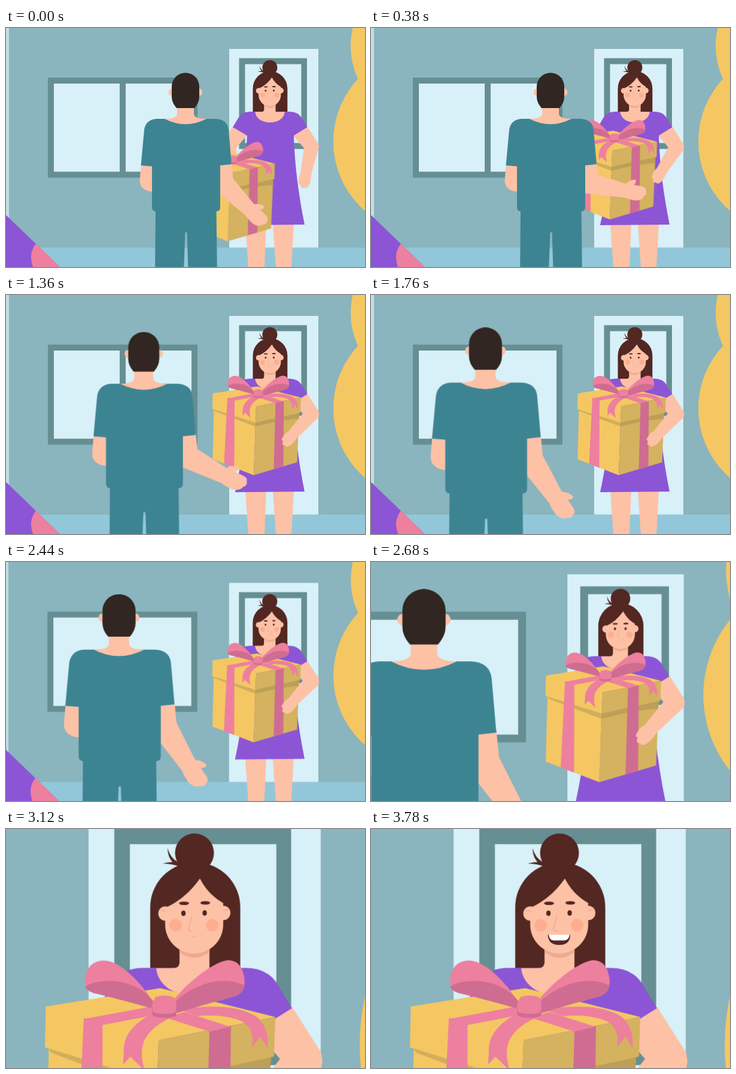
Recreate the animation shown at these times as an HTML page. Size 600 px wide and 400 px high, loop 4000 ms.

```html
<!DOCTYPE html>
<html lang="en">
<head>
<meta charset="utf-8">
<title>Gift delivery</title>
<style>
  html, body { margin: 0; height: 100%; overflow: hidden; background: #8ab4be; }
  svg { display: block; width: 100vw; height: 100vh; }

  .wall { fill: #8ab4be; }
  .floor { fill: #92c7d9; }
  .glass { fill: #d8f0f8; }
  .frame { fill: #668f94; }
  .skin { fill: #fdc1a6; }
  .shade { fill: #eea994; }
  .cheek { fill: #ffad91; }
  .hair { fill: #532722; }
  .crop { fill: #312621; }
  .shirt { fill: #3d8493; }
  .purple { fill: #8c55d5; }
  .yellow { fill: #f4c763; }
  .ochre { fill: #d4b25f; }
  .gap { fill: #d0ae5b; }
  .gap2 { fill: #bd9f57; }
  .pink { fill: #ed7f9f; }
  .rose { fill: #cf6c92; }
  .line { fill: none; stroke: #f0a48c; stroke-width: 1.2; stroke-linecap: round; }
  .lids { fill: none; stroke: #532722; stroke-width: 1.8; stroke-linecap: round; }

  .anim { animation: 4s linear infinite; }
  #camera { animation-name: zoom; transform-origin: 519.5px 82.4px; }
  #man { animation-name: leave; transform-origin: 845.5px 178.7px; }
  #reach { animation-name: reach; }
  #box { animation-name: hand-over; }
  #hold { animation-name: hold; transform-origin: 510.5px 200px; }
  #smile { animation-name: smile; transform-origin: 314px 179px; }
  #smirk { animation-name: smirk; animation-timing-function: step-end; }
  #eyes { animation-name: open; animation-timing-function: step-end; }
  #lids { animation-name: closed; animation-timing-function: step-end; }

  @keyframes zoom {
    0% { transform: scale(1); }
    60.375% { transform: scale(1); animation-timing-function: cubic-bezier(.85, 0, .68, 1); }
    73.5%, 100% { transform: scale(2.604); }
  }
  @keyframes leave {
    0% { transform: scale(1); }
    21.5% { transform: scale(1); animation-timing-function: cubic-bezier(.8, 0, .01, 1); }
    49.5%, 100% { transform: scale(1.2026); }
  }
  @keyframes reach {
    0% { transform: rotate(43deg); animation-timing-function: cubic-bezier(.75, 0, .25, 1); }
    17.5% { transform: rotate(-7.6deg); }
    21.5% { transform: rotate(-7.6deg); animation-timing-function: cubic-bezier(.82, 0, .035, 1); }
    49.5%, 100% { transform: rotate(55.5deg); }
  }
  @keyframes hand-over {
    0% { transform: translate(-43.5px, 55.5px); animation-timing-function: cubic-bezier(.75, 0, .25, 1); }
    17.5%, 100% { transform: translate(0, 0); }
  }
  @keyframes hold {
    0% { transform: rotate(0deg); animation-timing-function: cubic-bezier(.75, 0, .25, 1); }
    17.5%, 100% { transform: rotate(31deg); }
  }
  @keyframes smile {
    0%, 77.75% { transform: scale(0); }
    81.5%, 100% { transform: scale(1); }
  }
  @keyframes smirk { 0% { opacity: 1; } 78%, 100% { opacity: 0; } }
  @keyframes open { 0% { opacity: 1; } 91.5% { opacity: 0; } 94.5%, 100% { opacity: 1; } }
  @keyframes closed { 0% { opacity: 0; } 91.5% { opacity: 1; } 94.5%, 100% { opacity: 0; } }
</style>
</head>
<body>
<svg viewBox="0 0 600 400">
  <defs>
    <path id="upper" class="skin" d="M479 179L503.5 165L522 194Q525 203 512 208L498 201Z"/>
    <path id="fore" class="skin" d="M498 201A12.5 12.5 0 0 1 523 199L510 246Q510 255 507 262Q503 270 499 267Q494 270 493 264L492 262Q488 264 489 255Q489 248 492 244Z"/>
  </defs>
  <g id="camera" class="anim">
    <!-- room -->
    <rect class="wall" width="600" height="400"/>
    <rect class="floor" y="367.5" width="600" height="33"/>
    <rect width="5" height="367" fill="#bfdfe3"/>
    <rect class="frame" x="70" y="83" width="250" height="167.5"/>
    <path class="glass" d="M80 93H190V240.5H80ZM200 93H310V240.5H200Z"/>
    <rect class="glass" x="373" y="35" width="149" height="332.5"/>
    <rect class="frame" x="389.5" y="50.5" width="113.5" height="152"/>
    <rect class="glass" x="399.5" y="60.5" width="94" height="132"/>
    <g class="yellow"><circle cx="708" cy="30" r="132"/><circle cx="701" cy="190" r="154"/></g>
    <path class="purple" d="M0 313L90 400H0Z"/>
    <path class="pink" d="M50 361Q37 377 45 400H90Z"/>

    <!-- woman -->
    <path class="skin" d="M400 328H435L432 400H405ZM446 328H481L477 400H451Z"/>
    <g transform="matrix(-1 0 0 1 882.4 0)"><use href="#upper"/><use href="#fore"/></g>
    <use href="#upper"/>
    <g transform="scale(.38402) translate(833.3 132.2)">
      <path class="hair" d="M241 233V131A75.2 75.2 0 0 1 391.5 131V233Z"/>
      <circle class="hair" cx="315" cy="40" r="32.5"/>
      <path class="hair" d="M290 64Q270 54 270 32Q274 48 288 56ZM290 63Q277 58 262 58Q276 53 292 57Z"/>
    </g>
    <path class="purple" d="M408 140H474Q488 140 494.5 151L503.5 166L481 180Q483 250 499 329L383 330Q400 250 403 180L379 166L388 151Q394 140 408 140Z"/>
    <g transform="scale(.38402) translate(833.3 132.2)">
      <path class="skin" d="M251 233C257 295 374 295 380 233Z"/>
      <path class="skin" d="M290 190V222Q290 233 279 233V236H340V190Z"/>
      <path class="shade" d="M290 195V206Q315 225 340 206V195Z"/>
      <g class="skin"><ellipse cx="266" cy="141.5" rx="11.5" ry="12"/><ellipse cx="363.5" cy="140.5" rx="11.5" ry="12"/></g>
      <path class="line" d="M259 137Q266 135 268 141M371 136Q364 134 361 140"/>
      <path class="skin" d="M324 83Q300 117 266 132V160A48.5 48.5 0 0 0 363 160V124Q338 110 324 83Z"/>
      <g class="cheek"><circle cx="283.5" cy="161" r="10.5"/><circle cx="344.5" cy="161" r="10.5"/></g>
      <g class="hair">
        <ellipse cx="297.5" cy="124.3" rx="8.5" ry="2.9"/>
        <ellipse cx="333" cy="123.6" rx="8.2" ry="2.9"/>
      </g>
      <g id="eyes" class="anim hair">
        <ellipse cx="296.5" cy="141" rx="3.7" ry="4.4"/>
        <ellipse cx="332" cy="140.5" rx="3.7" ry="4.4"/>
      </g>
      <path id="lids" class="anim lids" d="M292 140Q297 143.5 301.5 140M327 139.5Q332 143 336.5 139.5"/>
      <path class="line" d="M311 145L305 166Q304 171 312 171"/>
      <path id="smirk" class="anim line" d="M314 182Q325 183 324 171"/>
      <g id="smile" class="anim">
        <path class="hair" d="M295.5 177H333Q333 194 314.5 194Q296 194 295.5 177Z"/>
        <path fill="#fff" d="M297 177H332Q331 186 322 186.5H305Q298 186 297 177Z"/>
      </g>
    </g>

    <!-- gift -->
    <g id="box" class="anim">
      <path class="yellow" d="M347.5 190L417 212L414 301.5L345.3 275Z"/>
      <path class="ochre" d="M417 212L490 196L486.5 280L414 301.5Z"/>
      <path class="gap" d="M347 191L417 212V220.3L349 194.5Z"/>
      <path class="gap2" d="M417 212L490.3 196L489.5 207.5Q462 208 416.9 220.3Z"/>
      <path class="yellow" d="M345.5 164.8L419 153L492.8 171.5L418 186.5L417 213.5L345 191Z"/>
      <path class="ochre" d="M418 186.5L492.8 171.5L492 197L417 213.5Z"/>
      <path class="pink" d="M370 172.2L382 175.8L381.5 289.2L364.5 282.5Z"/>
      <path class="rose" d="M450.6 180L464.3 177.2L463.5 286.8L447.5 291.6Z"/>
      <g transform="scale(.38402) translate(833.3 132.2)">
        <g class="pink">
          <path d="M130 318L243 297L250 311L161 328Z"/>
          <path d="M268 316L298 306L375 331L340 339Z"/>
          <path d="M290 302Q380 288 420 315Q440 334 437 366L425 347L411 366Q417 335 395 322Q365 309 320 313Z"/>
          <path d="M250 306Q200 330 197 365Q197 380 195.5 394L208 381L231.6 404Q222 372 232 352Q245 328 280 314Z"/>
          <path d="M246 290C225 255 190 220 163 220Q135 221 132 253Q132 274 155 276L243 299Z"/>
          <path d="M280 286C305 255 350 220 372 219.5Q396 220 399 255Q399 277 378 281L288 307Z"/>
        </g>
        <g class="rose">
          <path d="M132.5 264C150 250 215 246 246 288L243 300Q190 285 155 276.5Q136 273 132.5 264Z"/>
          <path d="M281 291C310 262 360 243 398.5 262Q397 276 378 281.5Q330 293 286 308Z"/>
          <path d="M250 283Q265 278 280 283Q289 299 284 313Q265 319 246 313Q240 298 250 283Z"/>
        </g>
        <path class="pink" d="M250 281Q265 276 280 281Q288 294 283 307Q265 312 246 307Q241 294 250 281Z"/>
      </g>
    </g>
    <use id="hold" class="anim" href="#fore"/>

    <!-- man -->
    <g id="man" class="anim">
      <path class="skin" d="M226 227L223.5 255Q224 273 246 274V227ZM356 225H377L380 256L356 262Z"/>
      <g transform="translate(363 259)">
        <path id="reach" class="anim skin" d="M0 -17.5L62 -9Q70 -18 77 -18Q80 -15 76 -9L90 -9Q97 -8 97 -4Q101 2 96 6Q94 14 84 16Q74 17 64 14.5L0 18A17.7 17.7 0 0 1 0 -17.5Z"/>
      </g>
      <path class="shirt" d="M250 300H351.5L353 420H305L302.5 342H299.5L296.5 420H249Z"/>
      <path class="shirt" d="M252 152H350Q370 153 372 170L377 228L358 230V300Q358 307 351 307H251Q244 307 244 300V231.5L225.5 230L231 170Q234 153 252 152Z"/>
      <path class="skin" d="M286 130V143Q286 152 265 152Q300 170 335 152Q314 152 314 143V130Z"/>
      <g class="skin"><ellipse cx="277" cy="107.5" rx="5.3" ry="6"/><ellipse cx="323" cy="107.5" rx="5.3" ry="6"/></g>
      <path class="crop" d="M277 98A23 23 0 0 1 323 98V115Q323 125 315 134H285Q277 125 277 115Z"/>
    </g>
  </g>
</svg>
</body>
</html>
```
